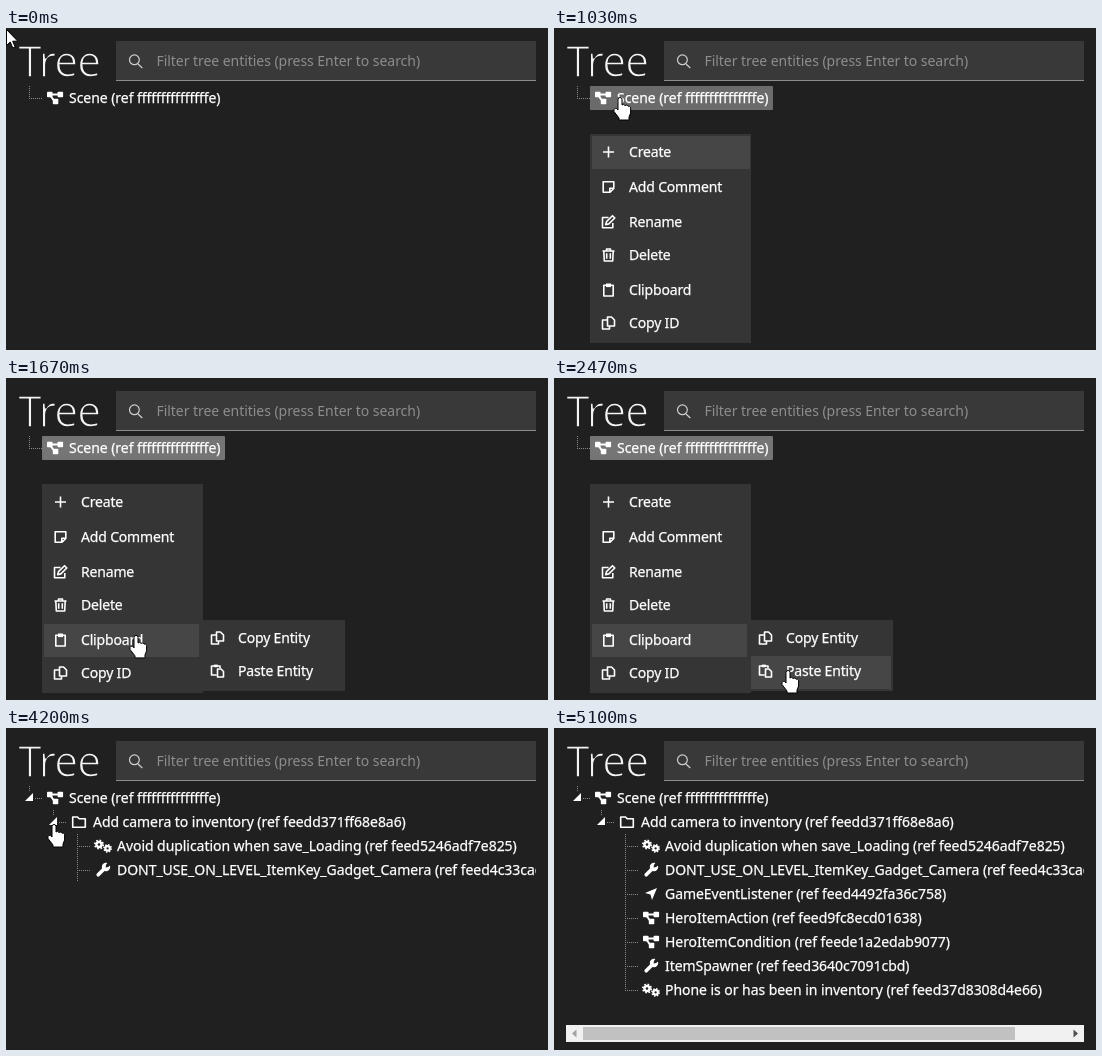
An HTML page that plays this animation: 542x322 px, repeating every 7.67 s.

```html
<!DOCTYPE html>
<html lang="en">
<head>
<meta charset="utf-8">
<title>Tree</title>
<style>
  html, body { margin: 0; width: 100%; height: 100%; overflow: hidden; background: #202020; }
  svg { display: block; width: 100%; height: 100%; }
  text { font: 14px "Noto Sans", "Open Sans", sans-serif; letter-spacing: -.05px; fill: #fff; stroke: #fff; stroke-width: .25; white-space: pre; }
  /* The outline in the page colour thins the strokes to a light weight. */
  .title { font-size: 43px; letter-spacing: -1.3px; fill: #f4f4f4; stroke: #202020; stroke-width: 1.7; }
  .hint { fill: #8d8d8d; stroke: none; }
  .menu text { letter-spacing: -.17px; }
  .solid { fill: #fff; }
  .line { fill: none; stroke: #fff; stroke-width: 1.6; stroke-linejoin: round; }
  .dots { fill: none; stroke: #8a8a8a; stroke-dasharray: 1 1; }
  .cursor { fill: #fff; stroke: #000; stroke-linejoin: round; }
</style>
</head>
<body>
<svg id="stage" viewBox="0 0 542 322"></svg>
<script>
const LOOP = 7670;
const stage = document.getElementById('stage');

const path = (cls, d) => `<path class="${cls}" d="${d}"/>`;
const rect = (x, y, w, h, fill, extra = '') =>
  `<rect x="${x}" y="${y}" width="${w}" height="${h}" fill="${fill}" ${extra}/>`;
const text = (x, y, s, cls = '') => `<text x="${x}" y="${y}" class="${cls}">${s}</text>`;
const at = (x, y, s) => `<g transform="translate(${x} ${y})">${s}</g>`;

// A ring with a dashed rim for teeth.
function gear(x, y, r) {
  const tooth = 2 * Math.PI * r / 16;
  return at(x, y,
    `<circle r="${r * .62}" fill="none" stroke="#fff" stroke-width="${r * .6}"/>` +
    `<circle r="${r}" fill="none" stroke="#fff" stroke-width="${r * .45}" stroke-dasharray="${tooth}"/>`);
}

const icons = {
  graph: [[-8, -6.2], [2.6, -6.2], [-2.2, .8]].map(p => rect(...p, 5.5, 5.5, '#fff', 'rx=".8"')).join('') +
    '<path d="M-4 -3.5H5M-5 -3L0 4" stroke="#fff" stroke-width="2"/>',
  folder: path('line', 'M-6.3 -5H-1.5L.2 -3.2H6.3V5.2H-6.3Z'),
  cogs: gear(-4, -1.5, 4.1) + gear(4.6, 2.4, 3.6),
  wrench: '<path d="M-4.8 4.8L2 -2" stroke="#fff" stroke-width="3.6" stroke-linecap="round"/>' +
    '<circle cx="3" cy="-3" r="4.2" fill="#fff"/><path d="M2.6 -2.6L3 -5.2L6 -9L9 -6L5.2 -3Z" fill="#202020"/>',
  arrow: path('solid', 'M6 -6L1 6L-.5 .5L-6 -1Z'),
  plus: path('line', 'M-5.5 0H5.5M0 -5.5V5.5'),
  note: path('line', 'M-5.3 -5.3H5.3V1.5L1.5 5.3H-5.3ZM5 1.3H1.3V5'),
  edit: path('line', 'M0 -4.5H-6V5.8H4.3V1M-2.8 2.6L-2 -.4L4 -6.3L6.3 -4L.3 1.9Z'),
  trash: path('line', 'M-6 -4H6M-2 -4V-6H2V-4M-4.7 -4L-4.2 6H4.2L4.7 -4M-1.8 -1.8V3.8M1.8 -1.8V3.8'),
  clip: path('line', 'M-4.7 -4.7H4.7V6H-4.7Z') + rect(-2.5, -6.5, 5, 3.6, '#fff'),
  copy: path('line', 'M-1 -6H3L6 -3V3H-1ZM-1 -3H-6V6H1V3'),
  paste: path('line', 'M-1 4H-6V-5H2.5V-3M0 -2H3.5L6 .5V6H0Z') + rect(-3.7, -6.4, 4, 2.6, '#fff')
};

const rows = [
  [0, 'graph', 'Scene (ref fffffffffffffffe)'],
  [1, 'folder', 'Add camera to inventory (ref feedd371ff68e8a6)'],
  [2, 'cogs', 'Avoid duplication when save_Loading (ref feed5246adf7e825)'],
  [2, 'wrench', 'DONT_USE_ON_LEVEL_ItemKey_Gadget_Camera (ref feed4c33cae81d09)'],
  [2, 'arrow', 'GameEventListener (ref feed4492fa36c758)'],
  [2, 'graph', 'HeroItemAction (ref feed9fc8ecd01638)'],
  [2, 'graph', 'HeroItemCondition (ref feede1a2edab9077)'],
  [2, 'wrench', 'ItemSpawner (ref feed3640c7091cbd)'],
  [2, 'cogs', 'Phone is or has been in inventory (ref feed37d8308d4e66)']
];
const mainItems = [
  [124, 'plus', 'Create'], [159, 'note', 'Add Comment'], [194, 'edit', 'Rename'],
  [227, 'trash', 'Delete'], [262, 'clip', 'Clipboard'], [295, 'copy', 'Copy ID']
];
const subItems = [[260, 'copy', 'Copy Entity'], [293, 'paste', 'Paste Entity']];

function treeRow([depth, icon, label], i) {
  const x = 23 + depth * 24, y = 70 + i * 24;
  const last = i === rows.length - 1;
  const links = depth < 2
    ? path('dots', `M${x + .5} ${y - 12}V${y - 6}M${x + 6} ${y + .5}H${x + 13}`)
    : path('dots', `M${x + .5} ${y - 12}V${last ? y : y + 12}M${x} ${y + .5}H${x + 14}`);
  return links + at(x + 26, y, icons[icon]) + text(x + 40, y + 5, label);
}

const menuRows = (items, x) => items.map(([y, icon, label]) =>
  at(x, y, icons[icon]) + text(x + 20.5, y + 5, label)).join('');

const closedMark = (x, y) => path('solid', `M${x - 2} ${y - 6}L${x + 4} ${y}L${x - 2} ${y + 6}Z`);
const openMark = (x, y) => path('solid', `M${x + 4} ${y - 5}V${y + 3}H${x - 4}Z`);

function expander(id, x, y) {
  return `<g id="${id}Closed">${closedMark(x, y)}</g><g id="${id}Open">${openMark(x, y)}</g>`;
}

stage.innerHTML = `
  <defs>
    <clipPath id="pane"><rect x="0" y="56" width="530" height="266"/></clipPath>
    <clipPath id="slide1"><rect id="reveal1" y="82" width="542" height="0"/></clipPath>
    <clipPath id="slide2"><rect id="reveal2" y="106" width="542" height="0"/></clipPath>
  </defs>
  ${rect(0, 0, 542, 322, '#202020')}
  ${text(12, 48.8, 'Tree', 'title')}
  ${rect(110, 13, 420, 40, '#393939')}${rect(110, 52, 420, 1, '#8d8d8d')}
  <path d="M132 36L136.3 40" stroke="#d0d0d0" stroke-width="1.2"/>
  <circle cx="128.4" cy="31.8" r="4.9" fill="none" stroke="#d0d0d0" stroke-width="1.2"/>
  ${text(150.5, 38, 'Filter tree entities (press Enter to search)', 'hint')}
  <g clip-path="url(#pane)">
    ${rect(36, 58, 183, 24, '#6b6b6b', 'id="hover" rx="1"')}
    ${treeRow(rows[0], 0)}
    <g id="leaf">${path('dots', 'M23.5 58V70M23 70.5H36')}</g>
    ${expander('scene', 23, 70)}
    <g clip-path="url(#slide1)">${treeRow(rows[1], 1)}${expander('folder', 47, 94)}</g>
    <g clip-path="url(#slide2)">${rows.slice(2).map((r, i) => treeRow(r, i + 2)).join('')}</g>
  </g>
  <g id="scrollbar">
    ${rect(12, 297, 518, 17, '#f1f1f1')}${rect(29, 299, 432, 13, '#c1c1c1')}
    <path d="M22.5 301.5V309.5L18 305.5Z" fill="#a3a3a3"/><path d="M519.5 301.5V309.5L524 305.5Z" fill="#505050"/>
  </g>
  <g id="menu" class="menu">
    ${rect(36, 106, 161, 209, '#353535')}
    ${rect(38, 0, 155, 33, '#464646', 'id="mainMark"')}
    ${menuRows(mainItems, 54.5)}
  </g>
  <g id="submenu" class="menu">
    ${rect(196, 242, 143, 71, '#353535')}
    ${rect(197, 0, 140, 33, '#464646', 'id="subMark"')}
    ${menuRows(subItems, 211.5)}
  </g>
  <path id="arrow" class="cursor" d="M.5 .5V16.5L4.2 13L6.8 19L9.2 18L6.7 12.2H11.8Z"/>
  <path id="hand" class="cursor" d="M-2 1.5a2 2 0 0 1 4 0V7a2 2 0 0 1 3 .5a2 2 0 0 1 3 .8a1.8 1.8 0 0 1 2.6 1.5V15L9 19V22H-1V20L-6 13.5V11.5a2 2 0 0 1 3.2 -.5L-2 12Z"/>`;

const el = {};
stage.querySelectorAll('[id]').forEach(node => el[node.id] = node);

const show = (node, on) => node.setAttribute('visibility', on ? 'inherit' : 'hidden');
const set = (node, name, value) => node.setAttribute(name, value);
const swing = p => .5 - Math.cos(Math.PI * Math.min(1, Math.max(0, p))) / 2;
const inside = ([x, y], l, t, r, b) => x >= l && x < r && y >= t && y < b;

const MENU_ON = 920, MENU_OFF = 2590, PASTED = 2750, OPEN_SCENE = 3530, OPEN_FOLDER = 4130, SLIDE = 200;

// start, end, bend point, end point
const moves = [
  [70, 740, [45, 30], [66, 70]],
  [1060, 1680, [90, 200], [130, 258]],
  [1690, 2380, [215, 252], [234, 293]],
  [2620, 3230, [110, 165], [19, 76]],
  [3620, 4060, [34, 87], [48, 97]],
  [4360, 5040, [40, 200], [36, 334]]
];

function pointer(t) {
  let pos = [0, 1];
  for (const [start, end, bend, to] of moves) {
    if (t < start) break;
    const p = swing((t - start) / (end - start)), q = 1 - p;
    pos = pos.map((v, i) => q * q * v + 2 * p * q * bend[i] + p * p * to[i]);
  }
  return pos;
}

function render(t) {
  const pos = pointer(t), [x, y] = pos;
  const menuOn = t >= MENU_ON && t < MENU_OFF;
  const overScene = inside(pos, 36, 58, 219, 82);

  const row = t > 1680 ? 4 : [141, 176, 210, 244].filter(edge => y >= edge).length;
  const subOn = menuOn && row === 4;
  const subRow = x < 197 ? -1 : y < 277 ? 0 : 1;
  show(el.menu, menuOn);
  set(el.mainMark, 'y', mainItems[row][0] - 16);
  set(el.mainMark, 'width', row === 4 ? 155 : 158);
  show(el.submenu, subOn);
  show(el.subMark, subOn && subRow >= 0);
  if (subRow >= 0) set(el.subMark, 'y', subItems[subRow][0] - 15);

  show(el.hover, overScene || menuOn);
  set(el.hover, 'fill', menuOn && !overScene ? '#757575' : '#6b6b6b');

  const parent = t >= PASTED, sceneOpen = t >= OPEN_SCENE, folderOpen = t >= OPEN_FOLDER;
  show(el.leaf, !parent);
  show(el.sceneClosed, parent && !sceneOpen);
  show(el.sceneOpen, sceneOpen);
  show(el.folderClosed, !folderOpen);
  show(el.folderOpen, folderOpen);
  set(el.reveal1, 'height', 24 * swing((t - OPEN_SCENE) / SLIDE));
  set(el.reveal2, 'height', 168 * swing((t - OPEN_FOLDER) / SLIDE));
  show(el.scrollbar, t >= OPEN_FOLDER + SLIDE);

  const hand = overScene ||
    menuOn && (inside(pos, 36, 106, 197, 315) || subOn && inside(pos, 196, 242, 339, 313)) ||
    parent && inside(pos, 11, 58, 36, 82) ||
    sceneOpen && inside(pos, 36, 82, 60, 106);
  show(el.hand, hand);
  show(el.arrow, !hand);
  const place = `translate(${x.toFixed(1)} ${y.toFixed(1)})`;
  set(el.hand, 'transform', place);
  set(el.arrow, 'transform', place);
}

const begin = performance.now();
function tick() {
  render((performance.now() - begin) % LOOP);
  requestAnimationFrame(tick);
}
tick();
</script>
</body>
</html>
```
